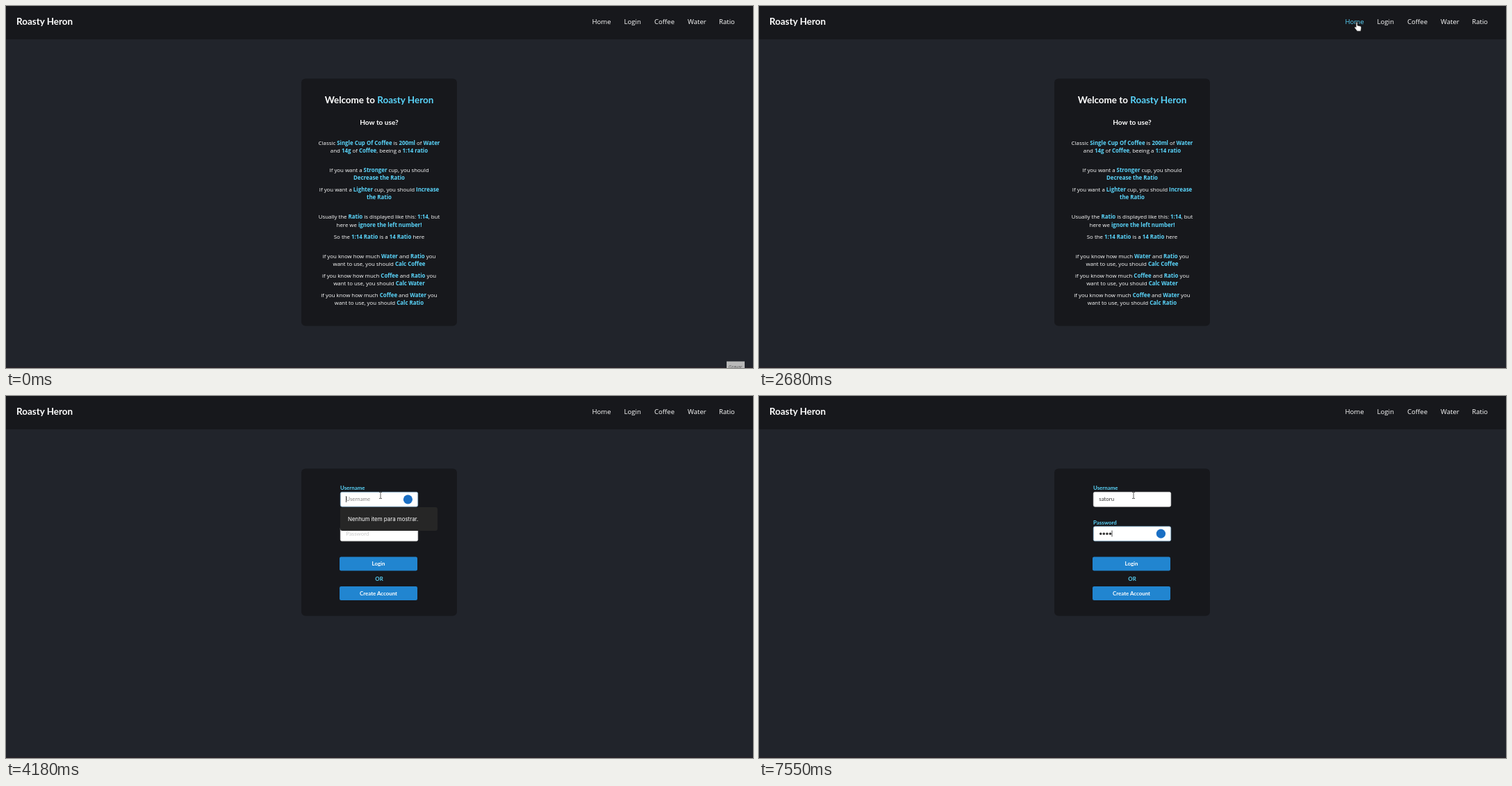
An HTML page for the animation above (8000 ms loop, 1075 by 521 pixels).

```html
<!DOCTYPE html>
<html lang="en">
<head>
<meta charset="utf-8">
<title>Roasty Heron</title>
<style>
  html, body { margin: 0; width: 100%; height: 100%; overflow: hidden; background: #21242b; }
  svg { display: block; }
  text { fill: #fff; white-space: pre; }
  .lato { font: 7.87px Lato, sans-serif; }
  .bold { font-weight: 700; }
  .body { font: 500 7.88px "Open Sans", sans-serif; }
  .body tspan { font-weight: 650; }
  .mid { text-anchor: middle; }
  .cyan, tspan { fill: #5ad5fb; }
  .nav { font: 500 9.6px "Open Sans", sans-serif; }
  .dark { fill: #17181c; }
  .btn { fill: #2185d0; }
  .typed { fill: #333; }
</style>
</head>
<body>
<svg width="1075" height="521" viewBox="0 0 1075 521">
  <rect width="1075" height="521" fill="#21242b"/>
  <rect y="520" width="1075" height="1" fill="#2a2127"/>
  <rect class="dark" width="1075" height="48"/>
  <text class="lato bold" x="15" y="27" style="font-size:13.44px">Roasty Heron</text>
  <g id="nav"></g>

  <g id="welcome">
    <rect class="dark" x="425" y="104.5" width="224" height="356" rx="6"/>
    <text class="lato bold mid" x="537" y="140" style="font-size:13.44px">Welcome to <tspan>Roasty Heron</tspan></text>
    <text class="lato bold mid" x="537" y="171" style="font-size:10.08px">How to use?</text>
  </g>

  <g id="login">
    <rect class="dark" x="425" y="104.5" width="224" height="212" rx="6"/>
    <g id="fields"></g>
    <rect class="btn" x="480" y="231.5" width="112" height="20" rx="2.2"/>
    <text class="lato bold mid" x="536" y="244">Login</text>
    <text class="lato bold mid cyan" x="537" y="265.6">OR</text>
    <rect class="btn" x="480" y="274" width="112" height="20" rx="2.2"/>
    <text class="lato bold mid" x="536" y="287">Create Account</text>
    <rect id="caret" width=".8" height="9" fill="#222"/>
    <circle id="badge" cx="578.4" r="6.6" fill="#1a6fc4"/>
    <g id="menu">
      <rect x="481" y="160" width="140" height="34" rx="3" fill="#262626"/>
      <text x="492" y="179.6" style="font:7.9px Inter,sans-serif">Nenhum item para mostrar.</text>
    </g>
  </g>

  <g id="status">
    <rect y="512" width="130" height="9" fill="#050505"/>
    <text x="1" y="519.6" style="font:500 6.3px 'Open Sans',sans-serif">https://roasty-heron.herokuapp.com/login</text>
  </g>
  <g id="tip">
    <rect x="1037" y="511.5" width="26" height="10" fill="#b9b9b9"/>
    <text x="1040" y="522" style="font:6.2px 'Open Sans',sans-serif;fill:#555">Gravar</text>
  </g>

  <circle id="click" r="6.5" fill="#beb914" fill-opacity=".75"/>
  <g id="cursor" stroke-width=".6">
    <path id="arrow" fill="#fff" stroke="#111" d="M0 0V8.6L2 6.8 3.4 10 4.9 9.4 3.6 6.3H6.2Z"/>
    <path id="hand" fill="#fff" stroke="#111" d="M-1 1Q0-.8 1 1V5L5.2 6Q6.8 6.5 6.6 8.4L5.8 13.2H.6L-3.2 8.2Q-3.4 6.5-1.8 7L-1 7.7Z"/>
    <path id="beam" fill="none" stroke="#333" stroke-width=".8" d="M-2-4.5H-.6L0-4 .6-4.5H2M0-4V4M-2 4.5H-.6L0 4 .6 4.5H2"/>
  </g>
</svg>
<script>
const LOOP = 8000;
const $ = id => document.getElementById(id);
const show = (id, on) => $(id).setAttribute('visibility', on ? 'inherit' : 'hidden');

const links = [['Home', 843.5], ['Login', 889.5], ['Coffee', 933], ['Water', 981], ['Ratio', 1026]];
$('nav').innerHTML = links.map(([name, x]) => `<text class="nav" x="${x}" y="26.3">${name}</text>`).join('');
const navItems = [...$('nav').children];

// Each line: centre y and text, with *highlights*.
const lines = [
  [197, 'Classic *Single Cup Of Coffee* is *200ml* of *Water*'],
  [208.3, 'and *14g* of *Coffee*, beeing a *1:14 ratio*'],
  [236.3, 'If you want a *Stronger* cup, you should'],
  [247.5, '*Decrease the Ratio*'],
  [264.4, 'If you want a *Lighter* cup, you should *Increase*'],
  [275.5, '*the Ratio*'],
  [303.5, 'Usually the *Ratio* is displayed like this: *1:14*, but'],
  [314.8, 'here we *ignore the left number!*'],
  [331.7, 'So the *1:14 Ratio* is a *14 Ratio* here'],
  [359.7, 'if you know how much *Water* and *Ratio* you'],
  [371, 'want to use, you should *Calc Coffee*'],
  [387.8, 'if you know how much *Coffee* and *Ratio* you'],
  [399, 'want to use, you should *Calc Water*'],
  [415.9, 'if you know how much *Coffee* and *Water* you'],
  [427.1, 'want to use, you should *Calc Ratio*']
];
$('welcome').innerHTML += lines.map(([y, s]) =>
  `<text class="body mid" x="537" y="${Math.round(y + 2.8)}">${s.replace(/\*(.+?)\*/g, '<tspan>$1</tspan>')}</text>`).join('');

$('fields').innerHTML = [['Username', 138], ['Password', 187.5]].map(([name, y]) => `
  <text class="lato bold cyan" x="481" y="${y - 2.6}">${name}</text>
  <rect id="box${name}" x="481.3" y="${y + .3}" width="111.4" height="21" rx="2.2" fill="#fff" stroke-width=".7"/>
  <text id="hint${name}" class="lato" x="489.3" y="${y + 13.3}">${name}</text>`).join('') +
  '<text id="user" class="lato typed" x="489.3" y="151.3"></text><g id="dots"></g>';
$('dots').innerHTML = [0, 1, 2, 3].map(i => `<circle class="typed" cx="${491.7 + 4.6 * i}" cy="198.3" r="1.7"/>`).join('');

const userName = 'satoru';
const userKeys = [4840, 4970, 5100, 5300, 5500, 5700];
const passKeys = [7030, 7160, 7420, 7550];
const pageAt = 3350, focusUser = 4110, focusPass = 6560;
const caretResets = [focusUser, ...userKeys, focusPass, ...passKeys];
const typed = (keys, t) => keys.filter(k => k <= t).length;

// Pointer track: time, x, y
const track = [
  [520, 716, 511], [700, 560, 380], [850, 318, 200], [1000, 400, 90], [1150, 560, 46],
  [1300, 604, 54], [1370, 608, 58], [1550, 571, 66], [1720, 592, 76.5], [1920, 592, 76.5],
  [1990, 594, 79], [2200, 680, 66], [2450, 800, 36], [2680, 860, 23], [2890, 898, 21],
  [3080, 904, 23], [3330, 904, 23], [3350, 899, 26], [3420, 860, 36], [3490, 814, 47],
  [3700, 680, 90], [3900, 570, 132], [4040, 539, 143], [LOOP, 539, 143]
];
function pointer(t) {
  const i = Math.max(1, track.findIndex(k => k[0] > t));
  const [t0, x0, y0] = track[i - 1], [t1, x1, y1] = track[i];
  const p = Math.max(0, (t - t0) / (t1 - t0));
  return [x0 + (x1 - x0) * p, y0 + (y1 - y0) * p];
}

function drawPointer(t) {
  const [x, y] = pointer(t);
  let overLink = false;
  links.forEach(([, left], i) => {
    const hover = t >= 520 && y < 36 && y > 14 && x >= left - 3 && x <= left + 28;
    navItems[i].style.fill = hover ? '#5ad5fb' : '';
    overLink = overLink || hover;
  });
  const overField = t > pageAt && x > 481 && x < 593 && y > 138 && y < 160;
  $('cursor').setAttribute('transform', `translate(${x} ${y})`);
  show('cursor', t >= 520);
  show('hand', t >= 520 && overLink);
  show('beam', t >= 520 && overField);
  show('arrow', t >= 520 && !overLink && !overField);
  $('click').setAttribute('cx', x);
  $('click').setAttribute('cy', y);
  show('click', (t >= 3150 && t < pageAt) || (t >= 4045 && t < 4175));
}

function drawForm(t) {
  const letters = typed(userKeys, t), dots = typed(passKeys, t);
  const inUser = t >= focusUser && t < focusPass, inPass = t >= focusPass;
  $('user').textContent = userName.slice(0, letters);
  [...$('dots').children].forEach((dot, i) => dot.setAttribute('visibility', i < dots ? 'inherit' : 'hidden'));
  for (const [name, focused, count] of [['Username', inUser, letters], ['Password', inPass, dots]]) {
    $('box' + name).setAttribute('stroke', focused ? '#85b7d9' : '#dedede');
    $('hint' + name).style.fill = focused ? '#858585' : '#c8c8c8';
    show('hint' + name, !count);
  }
  const since = t - Math.max(...caretResets.filter(k => k <= t), 0);
  const offset = inPass ? 4.6 * dots : letters ? $('user').getComputedTextLength() : 0;
  $('caret').setAttribute('x', 489.2 + offset);
  $('caret').setAttribute('y', inPass ? 193.5 : 144);
  show('caret', (inUser || inPass) && since % 1060 < 530);
  $('badge').setAttribute('cy', inPass ? 198.2 : 148.8);
  show('badge', inUser || inPass);
  show('menu', t >= 4180 && t < userKeys[0]);
}

function draw(now) {
  const t = now % LOOP;
  $('welcome').style.display = t < pageAt ? '' : 'none';
  $('login').style.display = t < pageAt ? 'none' : '';
  $('tip').setAttribute('opacity', t < 70 ? 1 : t < 140 ? .5 : 0);
  show('status', t >= 2820 && t < 3630);
  drawForm(t);
  drawPointer(t);
}

const start = performance.now();
function tick() {
  draw(performance.now() - start);
  requestAnimationFrame(tick);
}
tick();
</script>
</body>
</html>
```
